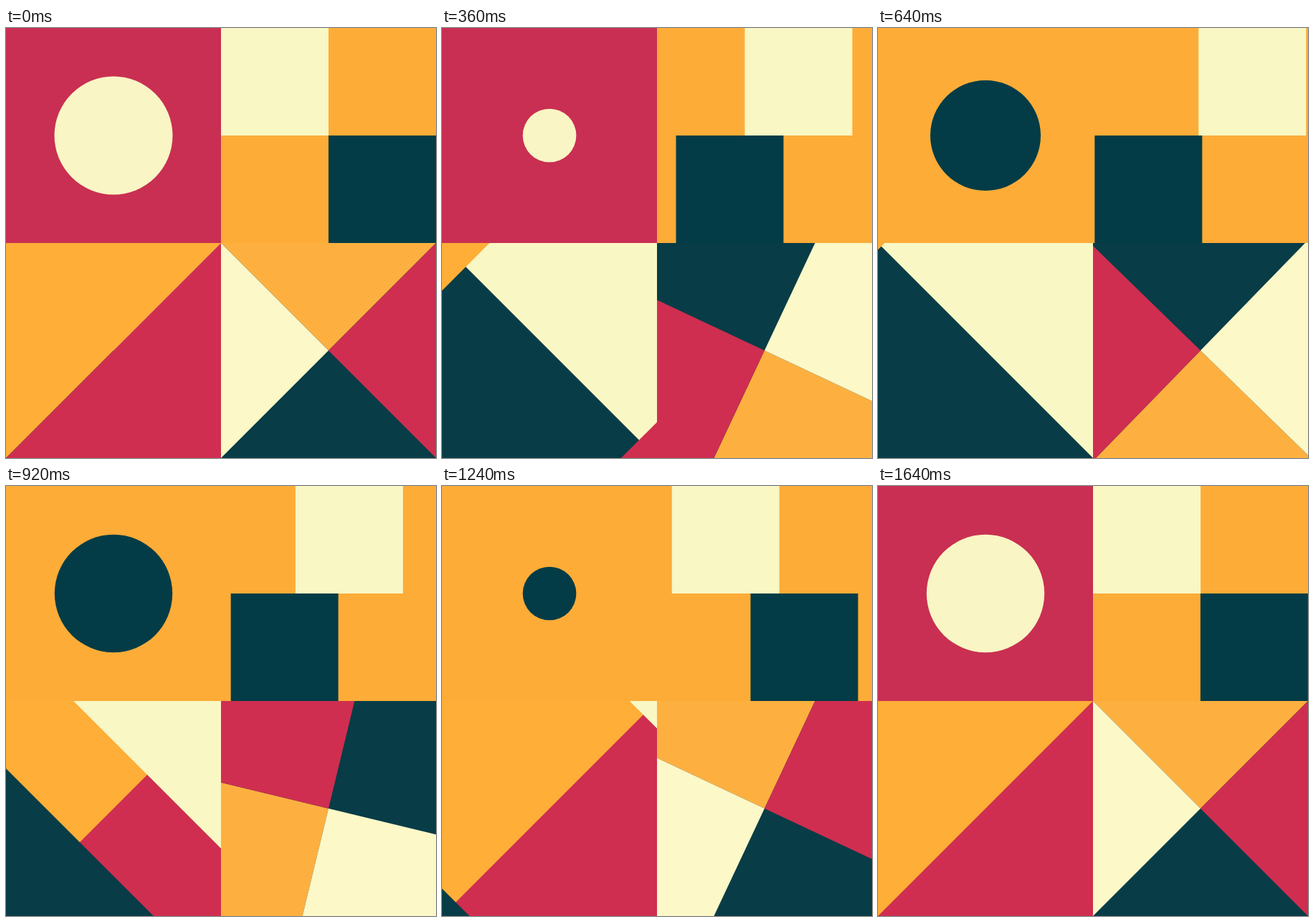
An HTML page with a canvas that plays this animation: 600 by 600 pixels, repeating every 1680 ms.

```html
<!DOCTYPE html>
<html lang="en">
<head>
<meta charset="utf-8">
<title>Geometric tiles</title>
<style>
  html, body { margin: 0; width: 100%; height: 100%; overflow: hidden; }
  canvas { display: block; width: 600px; height: 600px; }
</style>
</head>
<body>
<canvas id="stage" width="600" height="600"></canvas>
<script>
const ctx = document.getElementById('stage').getContext('2d');
const LOOP = 1680, SECOND = 880, MOVE = 800;

// Cubic Bezier easing, solved for its parameter by bisection.
function bezier(x1, y1, x2, y2) {
  const curve = (s, a, b) => 3 * (1 - s) ** 2 * s * a + 3 * (1 - s) * s * s * b + s ** 3;
  return x => {
    if (x <= 0) return 0;
    if (x >= 1) return 1;
    let low = 0, high = 1;
    for (let i = 0; i < 30; i++) {
      const mid = (low + high) / 2;
      if (curve(mid, x1, x2) < x) low = mid; else high = mid;
    }
    return curve(low, y1, y2);
  };
}

const snap = bezier(0, 0, 0, 1);
const swell = bezier(0, 0.27, 0.15, 1);
const creamOut = bezier(0.167, 0.15, 0.16, 1);
const darkOut = bezier(0.365, 0, 0, 1);
const darkBack = bezier(0.167, 0.167, 0, 1);
const orangeFold = bezier(0.167, 0.15, 0.2, 0.95);
const redFold = bezier(0.167, 0.167, 0.27, 1);

function rect(color, x, y, w, h) {
  ctx.fillStyle = color;
  ctx.fillRect(x, y, w, h);
}

function poly(color, ...points) {
  ctx.fillStyle = color;
  ctx.beginPath();
  for (const [x, y] of points) ctx.lineTo(x, y);
  ctx.fill();
}

function tile(x, y, paint) {
  ctx.save();
  ctx.translate(x, y);
  ctx.beginPath();
  ctx.rect(0, 0, 300, 300);
  ctx.clip();
  paint();
  ctx.restore();
}

function drawCircle(t, second) {
  const half = MOVE / 2;
  const flipped = second ? t < half : t >= half;
  rect(flipped ? '#fdac38' : '#c92f52', 0, 0, 300, 300);
  ctx.fillStyle = flipped ? '#033c46' : '#f9f5c4';
  ctx.beginPath();
  ctx.arc(150, 150, 82.5 * swell(Math.abs(t - half) / half), 0, 2 * Math.PI);
  ctx.fill();
}

function drawSquares(t, second) {
  const x = t / MOVE;
  const cream = second ? 1 - snap(x) : creamOut(x);
  const dark = second ? darkBack(x) : 1 - darkOut(x);
  rect('#fdac38', 0, 0, 300, 300);
  rect('#f9f7c4', 150 * cream, 0, 150, 150);
  rect('#033c46', 150 * dark, 150, 150, 150);
}

function drawFolds(t, second) {
  const orange = '#ffae38', red = '#cf2e50', cream = '#f9f7c4', dark = '#083c46';
  if (second) {
    const k = 300 * snap(t / 770);
    rect(orange, 0, 0, 300, 300);
    poly(red, [300, 0], [300, 300], [0, 300]);
    poly(cream, [k, 0], [300, 0], [300, 300 - k]);
    poly(dark, [0, k], [0, 300], [300 - k, 300]);
  } else {
    const a = 300 * (1 - orangeFold(t / MOVE));
    const b = 300 * redFold(t / 700);
    rect(cream, 0, 0, 300, 300);
    poly(dark, [0, 0], [300, 300], [0, 300]);
    poly(orange, [0, 0], [a, 0], [0, a]);
    poly(red, [300, b], [300, 300], [b, 300]);
  }
}

function drawPinwheel(t, second) {
  rect('#083c46', 0, 0, 300, 300);
  ctx.translate(150, 150);
  ctx.rotate(Math.PI * (snap(t / 720) + (second ? 1 : 0)));
  const R = 300;
  poly('#fdb040', [0, 0], [-R, -R], [R, -R]);
  poly('#cf2e50', [0, 0], [R, -R], [R, R]);
  poly('#fcf8c7', [0, 0], [-R, R], [-R, -R]);
}

function draw(now) {
  const time = now % LOOP;
  const second = time >= SECOND;
  const t = Math.min(second ? time - SECOND : time, MOVE);
  tile(0, 0, () => drawCircle(t, second));
  tile(300, 0, () => drawSquares(t, second));
  tile(0, 300, () => drawFolds(t, second));
  tile(300, 300, () => drawPinwheel(t, second));
}

let start;
function loop(now) {
  start ??= now;
  draw(now - start);
  requestAnimationFrame(loop);
}
draw(0);
requestAnimationFrame(loop);
</script>
</body>
</html>
```
